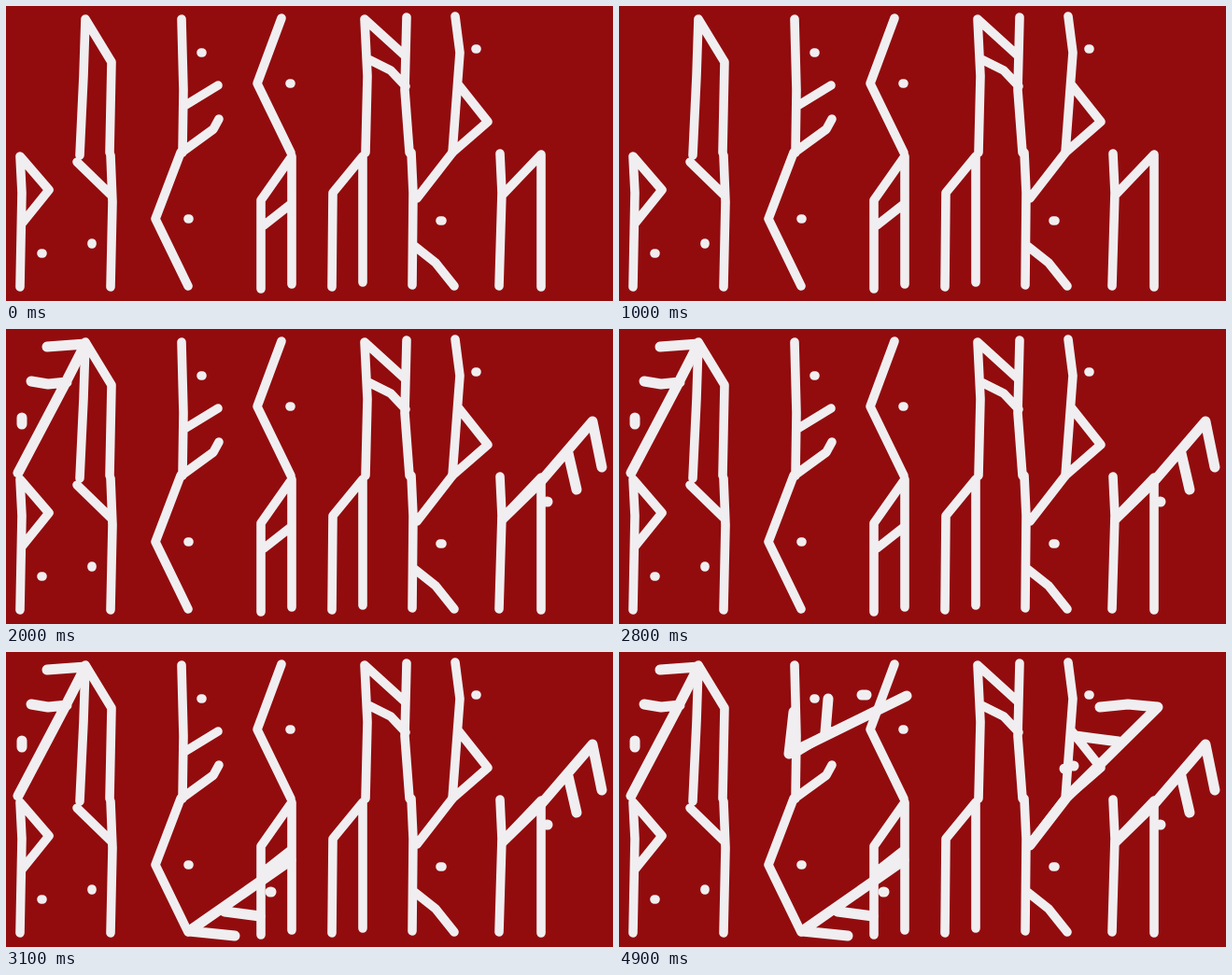
Animation of 650 by 316 pixels, one loop 6 s. Source, as an HTML page:

```html
<!DOCTYPE html>
<html lang="ru">
<head>
<meta charset="utf-8">
<title>Runic lettering</title>
<style>
html, body { margin: 0; width: 100%; height: 100%; overflow: hidden; background: #920c0e; }
svg { display: block; width: 100%; height: 100%; }
path { fill: none; stroke: #f0eef0; stroke-linecap: round; stroke-linejoin: round; }
.letter { stroke-width: 9.6px; }
.rune { stroke-width: 11px; }
</style>
</head>
<body>
<svg viewBox="0 0 650 316">
  <!-- Upper word; a zero-length line is a dot -->
  <path class="letter" d="M85 14L83 75 79 160M85 14L113 60 111 157"/>
  <path class="letter" d="M188 14L190 90 189 157M191 107L227 85M189 156L222 132 228 121M209 50h1"/>
  <path class="letter" d="M295 13L269 83 305 157M304 83h1"/>
  <path class="letter" d="M385 157L387 75 384 14 428 54M388 57L412 69 428 86M429 12L427 90 432 157"/>
  <path class="letter" d="M481 11L486 50 478 157 516 124 485 85M503 46h1"/>

  <!-- Lower word -->
  <path class="letter" d="M15 301L17 200 15 161 46 197 17 233M38 265h1"/>
  <path class="letter" d="M112 160L114 210 112 301M76 167L112 202M92 254v1"/>
  <path class="letter" d="M187 157L160 228 195 300M195 228h1"/>
  <path class="letter" d="M273 303L273 208 306 161 306 298M276 235L304 213"/>
  <path class="letter" d="M349 301L350 200 382 161 382 296"/>
  <path class="letter" d="M434 157L436 200 435 299M478 157L440 206M436 256L460 275 480 300M465 230h2"/>
  <path class="letter" d="M529 158L531 200 528 300M532 202L573 159 573 301"/>

  <!-- Bind runes, each shown from its own time -->
  <path class="rune" data-at="1100" d="M44 19L85 16 62 61 13 154M27 56L45 59 65 57M17 95v7"/>
  <path class="rune" data-at="2000" d="M532 203L573 163 628 99 638 148M602 133L611 172M579 185h1"/>
  <path class="rune" data-at="3100" d="M305 223L196 299 245 304M234 278L272 283M283 257h1"/>
  <path class="rune" data-at="4100" d="M440 207L480 155 577 59 545 56 515 59M489 90L535 96M477 125h1M486 122h1"/>
  <path class="rune" data-at="4900" d="M308 47L182 109 187 64M221 86L224 50M260 46h5"/>
</svg>
<script>
const LOOP = 6000;
const runes = [...document.querySelectorAll('.rune')];

function update(ms) {
  const t = ms % LOOP;
  for (const rune of runes) {
    rune.style.visibility = t >= Number(rune.dataset.at) ? 'visible' : 'hidden';
  }
}

const start = performance.now();
function tick() {
  update(performance.now() - start);
  requestAnimationFrame(tick);
}
tick();
</script>
</body>
</html>
```
